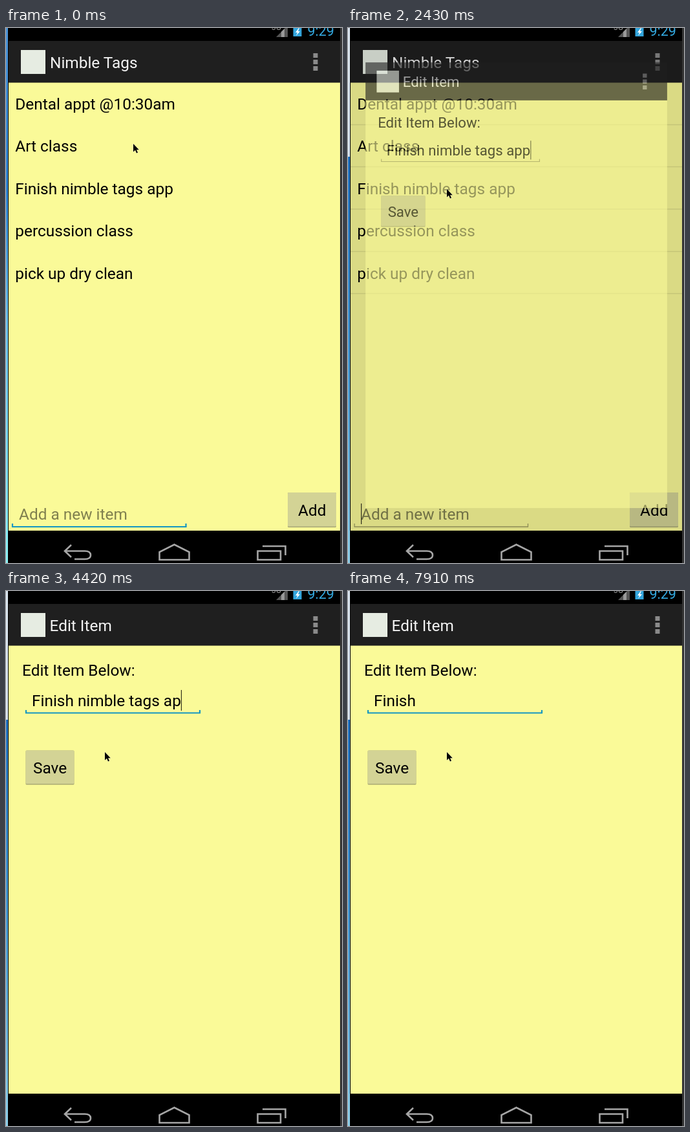
An HTML page that plays this animation: 520 px wide and 827 px high, repeating every 8 s.

```html
<!DOCTYPE html>
<html lang="en">
<head>
<meta charset="utf-8">
<title>Nimble Tags</title>
<style>
  html, body { margin: 0; width: 100%; height: 100%; overflow: hidden; background: #000; }
  svg { display: block; width: 100%; height: 100%; }
  text { font: 24.4px Roboto, "Noto Sans", sans-serif; white-space: pre; }
  .title { fill: #f3f3f3; }
  .hint { fill: #80804f; }
  .nav { fill: none; stroke: #a6a6a6; stroke-width: 2.6; }
  .rule { stroke: #000; stroke-opacity: .1; }
  .caret { fill: #33331f; }
  .field { fill: none; stroke: #a09f62; stroke-width: 1.3; }
  .field.focus { stroke: #1597c2; stroke-width: 2.2; }
  #edit { transform-origin: 260.5px 388.5px; }
</style>
</head>
<body>
<svg viewBox="0 0 520 827" preserveAspectRatio="none">
  <defs>
    <linearGradient id="sky" x2="0" y2="1">
      <stop stop-color="#4c94d8"/><stop offset=".3" stop-color="#2f86d6"/>
      <stop offset=".55" stop-color="#6fc4f0"/><stop offset="1" stop-color="#8df3f6"/>
    </linearGradient>
    <linearGradient id="sea" x2="0" y2="1">
      <stop stop-color="#2476c4"/><stop offset=".5" stop-color="#4a9fd8"/><stop offset="1" stop-color="#8fd0ea"/>
    </linearGradient>
    <g id="bar">
      <rect x="4" y="20" width="513" height="64.5" fill="#1f1f1f"/>
      <rect x="23" y="34" width="38" height="37" fill="#e6ece2"/>
      <path d="M475.5 39h7v7h-7zm0 10h7v7h-7zm0 10h7v7h-7z" fill="#8a8a8a"/>
    </g>
  </defs>

  <rect width="520" height="827"/>
  <rect x="517" width="3" height="827" fill="#343434"/>
  <rect id="sideA" width="3" height="827" fill="url(#sky)"/>
  <g id="sideB">
    <rect width="3" height="199" fill="#dbe6f0"/>
    <rect y="199" width="3" height="628" fill="url(#sea)"/>
  </g>

  <text x="411" y="3" style="font-size:12px" fill="#999">3G</text>
  <path d="M418 14L436 -4V14z" fill="#555"/>
  <path d="M426 14V6L431 1V14z" fill="#999"/>
  <path d="M444.500 0h13v13h-13z" fill="#33a5dc"/>
  <path d="M453 0l-5 7h3l-2 5 6-7h-3l2-5z" fill="#fff"/>
  <text x="466.500" y="12" style="font-size:21.5px" fill="#33a9e0">9:29</text>

  <g class="nav">
    <path d="M101 799L91 808.500L101 818M91 808.500H122Q131 808.500 131 815Q131 821 122 821H106"/>
    <path d="M237.500 822V810L260.500 798.500L283.500 810V822z"/>
    <path d="M389.500 808.500H425V822H389.500zM397 801H432.500V815"/>
  </g>

  <g id="list">
    <rect x="4" y="84" width="513" height="693" fill="#fafa98"/>
    <use href="#bar"/>
    <text class="title" x="68" y="62">Nimble Tags</text>
    <g id="rows"></g>
    <path id="rule1" class="rule" d="M196 149.500H289"/>
    <path id="rule2" class="rule" d="M20 214.500H255M20 280H255M20 345.500H255M20 410.500H255"/>
    <path id="rule3" class="rule" d="M4 279.500H516"/>
    <path id="rule4" class="rule" stroke-width="1.6" d="M4 149.500H517M4 214.500H517M4 280H517M4 345.500H517M4 410.500H517"/>
    <text class="hint" x="20" y="760">Add a new item</text>
    <rect id="listCaret" class="caret" x="20" y="735" width="1.2" height="32"/>
    <path id="listField" class="field" d="M10 766V771H278.500V766"/>
    <rect x="436" y="718" width="75" height="54" rx="1.5" fill="#a9a975"/>
    <rect x="436" y="718" width="75" height="52.500" rx="1.5" fill="#d3d395"/>
    <text x="452" y="754">Add</text>
  </g>
  <rect id="dim" x="4" y="20" width="513" height="757"/>

  <g id="edit">
    <rect x="4" y="84" width="513" height="693" fill="#fafa98"/>
    <use href="#bar"/>
    <text class="title" x="67.500" y="62">Edit Item</text>
    <text x="25" y="131">Edit Item Below:</text>
    <text id="entry" x="40" y="178" xml:space="preserve"></text>
    <rect id="editCaret" class="caret" y="153" width="1.2" height="32"/>
    <path id="editField" class="field" d="M31 184V188.500H300V184"/>
    <rect x="30.500" y="246.500" width="75" height="53" rx="1.5" fill="#a9a975"/>
    <rect x="30.500" y="246.500" width="75" height="51.500" rx="1.5" fill="#d3d395"/>
    <text x="42" y="282">Save</text>
  </g>

  <path id="pointer" d="M0 0V12.500L3 9.800L5 14.500L7 13.600L5 9.200H8.800z" stroke="#fff" stroke-opacity=".6" stroke-width=".7" paint-order="stroke"/>
</svg>

<script>
  const LOOP = 8000;
  const ITEM = 'Finish nimble tags app';
  const items = ['Dental appt @10:30am', 'Art class', ITEM, 'percussion class', 'pick up dry clean'];
  const $ = id => document.getElementById(id);

  items.forEach((label, i) => {
    const row = document.createElementNS('http://www.w3.org/2000/svg', 'text');
    row.setAttribute('x', 14.3);
    row.setAttribute('y', 126 + 65.4 * i);
    row.textContent = label;
    $('rows').append(row);
  });

  // Each entry is [start time, value], held until the next one.
  const pointer = [[0, [197, 179]], [150, [278, 145]], [280, [244, 158]],
                   [430, [196, 205]], [560, [144, 252]], [710, [150, 250]], [830, [153, 249]]];
  // [start time, scale, opacity, dim behind]
  const opening = [[0, [1, 0, 0]], [2430, [.91, .6, .13]], [3130, [.975, .88, .48]],
                   [3720, [.993, .96, .5]], [3840, [1, 1, 0]]];
  const listCaret = [[0, false], [430, true], [830, false], [1280, true]];
  const editCaret = [[0, true], [4260, false], [4420, true], [7910, false]];
  const deletions = [4420, 4700, 5130, 5260, 5410, 5570, 5850, 5970,
                     6240, 6370, 6680, 6830, 7080, 7230, 7360];

  const at = (t, steps) => steps.findLast(([start]) => t >= start)[1];
  const show = (id, on) => { $(id).style.display = on ? '' : 'none'; };

  function render(t) {
    show('sideA', t < 1130);
    show('sideB', t >= 1130);
    show('rule1', t >= 150 && t < 2430);
    show('rule2', t >= 430 && t < 2430);
    show('rule3', t >= 1280 && t < 2430);
    show('rule4', t >= 2430);
    show('listCaret', at(t, listCaret));
    $('listField').classList.toggle('focus', t < 1280);

    const [scale, opacity, dim] = at(t, opening);
    show('edit', opacity > 0);
    $('edit').style.transform = `scale(${scale})`;
    $('edit').style.opacity = opacity;
    $('dim').style.opacity = dim;

    const removed = deletions.filter(time => t >= time).length;
    $('entry').textContent = ITEM.slice(0, ITEM.length - removed);
    if (opacity > 0) $('editCaret').setAttribute('x', 40 + $('entry').getComputedTextLength());
    show('editCaret', at(t, editCaret));
    $('editField').classList.toggle('focus', t >= 3960);

    $('pointer').setAttribute('transform', `translate(${at(t, pointer)})`);
  }

  function frame() {
    render(performance.now() % LOOP);
    requestAnimationFrame(frame);
  }
  frame();
</script>
</body>
</html>
```
